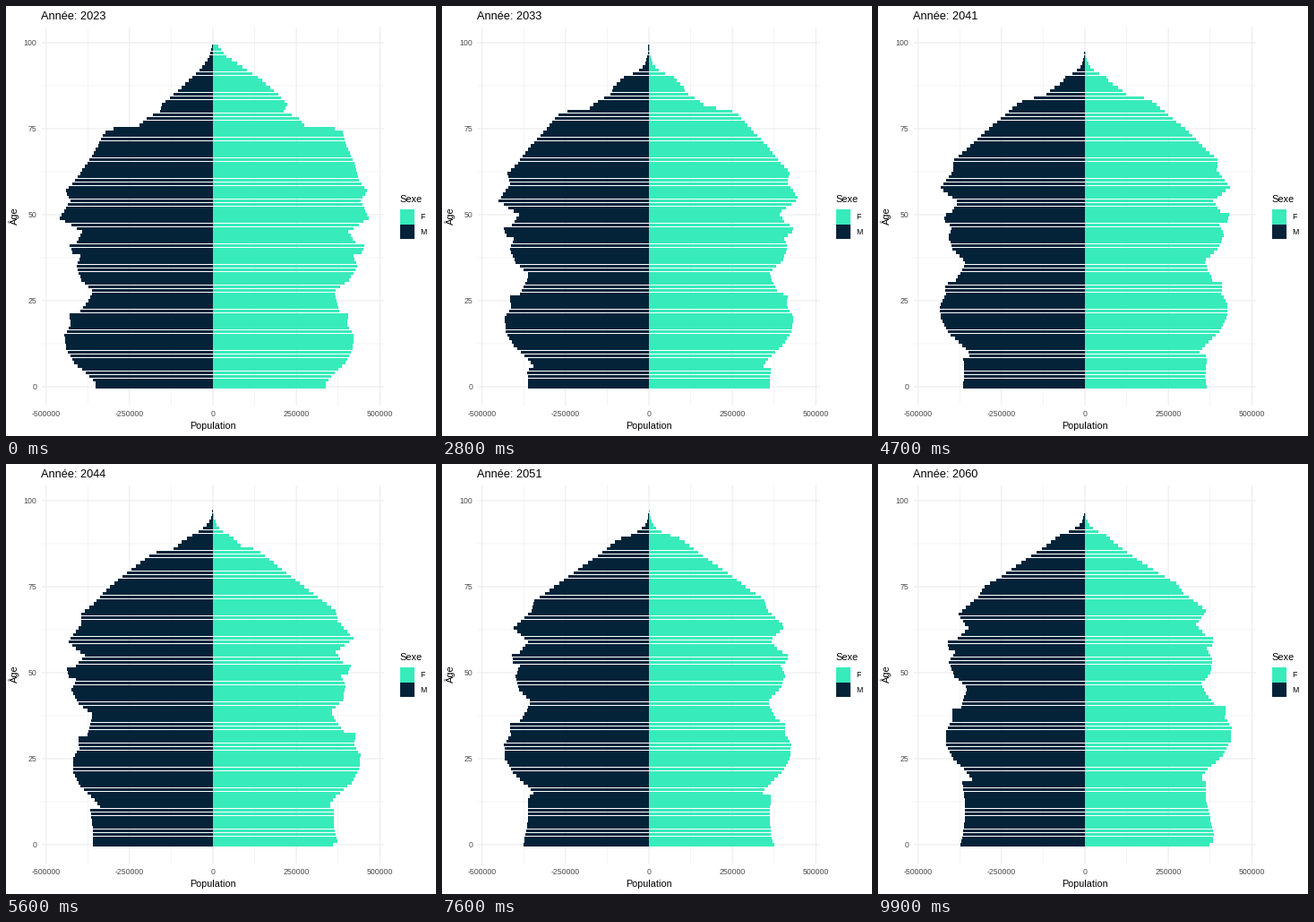
Animation, 480 px wide and 480 px high, one loop 10000 ms. Source, as a matplotlib script:

```python
import numpy as np
import matplotlib.pyplot as plt
from matplotlib.animation import FuncAnimation
from matplotlib.patches import Rectangle

SIZE = 480
FRAMES = 100
FIRST, LAST = 2023, 2060
STEPS = LAST - FIRST
TEAL, NAVY = "#38ebbb", "#042339"
GRID, GREY = "#ebebeb", "#4d4d4d"

X0, X_UNIT = 231.0, 186.3 / 500000     # zero line, pixels per person
Y0, Y_UNIT = 424.95, 3.84              # age zero, pixels per year of age
LEFT, RIGHT = 39.6, 422.4
TOP, BOTTOM = Y0 - 104.445 * Y_UNIT, Y0 + 5.445 * Y_UNIT

AGES = np.arange(100)


def curve(x, *points):
    """Piecewise linear curve through (x, y) points."""
    return np.interp(x, *zip(*points))


# Women by age in the first year, as bar lengths in pixels.
WOMEN = curve(
    AGES, (0, 126), (1, 126), (3, 132), (7, 148), (11, 156), (15, 157),
    (18, 150), (21, 151), (22, 141), (27, 136), (28, 137), (31, 152),
    (35, 161), (38, 157), (39, 166), (41, 169), (42, 159), (45, 151),
    (49, 174), (54, 165), (57, 172), (60, 163), (65, 158), (70, 149),
    (74, 145), (75, 136), (76, 102), (78, 96), (80, 79), (82, 83),
    (85, 73), (90, 50), (96, 15), (99, 6))

# Men per woman at each age.
MEN = WOMEN * curve(
    AGES, (0, 1.04), (21, 1.06), (25, 1.005), (35, .943), (40, .945),
    (49, .983), (60, .945), (65, .886), (73, .845), (80, .747), (90, .46),
    (99, .17))

# Cumulative mortality: exponential, steeper past ninety.
HAZARD = .14 * np.exp((AGES - 60) * .0895) + .3 * np.maximum(AGES - 90, 0)


def men_born(year):
    return curve(year, (6, 135), (16, 144), (19, 142))


def women_born(year):
    return 134 + 4 * ((year - 8) / 9) ** 2


def aged(base, born, years):
    """Population after the given number of years."""
    if years == 0:
        return base.copy()
    out = np.empty(100)
    out[years:] = base[:-years] * np.exp(HAZARD[:-years] - HAZARD[years:])
    out[:years] = born(years - AGES[:years])
    return out


def men(years):
    return aged(MEN, men_born, years)


def women(years):
    out = aged(WOMEN, women_born, years)
    if years:
        out[years] = women_born(0)
    return out


def state(k):
    """Left and right bar lengths; the two series alternate sides."""
    half = k // 2
    if k % 2:
        left, right = women(half), men(half + 1)
    else:
        left, right = men(half), women(half)
    if k:
        right[0] = left[0]
    return np.array([left, right])


STATES = [state(k) for k in range(STEPS + 1)]
KEYS = np.round(np.arange(STEPS + 1) * (FRAMES - 1) / STEPS)


def lengths(i):
    pos = np.interp(i, KEYS, np.arange(STEPS + 1))
    k = min(int(pos), STEPS - 1)
    t = pos - k
    return STATES[k] * (1 - t) + STATES[k + 1] * t


plt.rcParams["font.family"] = "Liberation Sans"
fig = plt.figure(figsize=(SIZE / 72, SIZE / 72), dpi=72, facecolor="white")
ax = fig.add_axes([0, 0, 1, 1])
ax.axis("off")


def line(xs, ys, major):
    ax.plot(xs, ys, color=GRID, lw=1.07 if major else .53,
            solid_capstyle="butt", snap=False, zorder=1)


def label(x, y, text, size, color="black", ha="left", **kw):
    return ax.text(x, y, text, fontsize=size, color=color, ha=ha,
                   va="baseline", **kw)


for n in range(-4, 5):
    people = n * 125000
    x = X0 + people * X_UNIT
    major = n % 2 == 0
    line([x, x], [TOP, BOTTOM], major)
    if major:
        label(x, 458, str(people), 8.8, GREY, "center")

for n in range(9):
    y = Y0 - n * 12.5 * Y_UNIT
    major = n % 2 == 0
    line([LEFT, RIGHT], [y, y], major)
    if major:
        label(34.5, y + 3.2, str(n * 25 // 2), 8.8, GREY, "right")

title = label(39, 15, "", 12.7)
label(X0, 472, "Population", 10.8, ha="center")
label(13, 234, "Âge", 11, ha="center", rotation=90, rotation_mode="anchor")
label(439, 219, "Sexe", 11)
for y, height, name, color in ((227, 17, "F", TEAL), (244, 16, "M", NAVY)):
    ax.add_patch(Rectangle((440, y), 16, height, fc=color, lw=0, aa=False))
    label(462, y + 11.2, name, 8.8)


def bars(color):
    return ax.barh(Y0 - AGES * Y_UNIT, np.zeros(100), height=.9 * Y_UNIT,
                   left=X0, color=color, linewidth=0, antialiased=False,
                   zorder=2)


left_bars, right_bars = bars(NAVY), bars(TEAL)
ax.set_xlim(0, SIZE)
ax.set_ylim(SIZE, 0)


def draw(i):
    left, right = lengths(i)
    for bar, w in zip(left_bars, left):
        bar.set_width(-w)
    for bar, w in zip(right_bars, right):
        bar.set_width(w)
    year = round(FIRST + STEPS * i / (FRAMES - 1))
    title.set_text(f"Année: {year}")
    return [title, *left_bars, *right_bars]


anim = FuncAnimation(fig, draw, frames=FRAMES, interval=100,
                     repeat=True, repeat_delay=0, blit=False)
plt.show()
```
